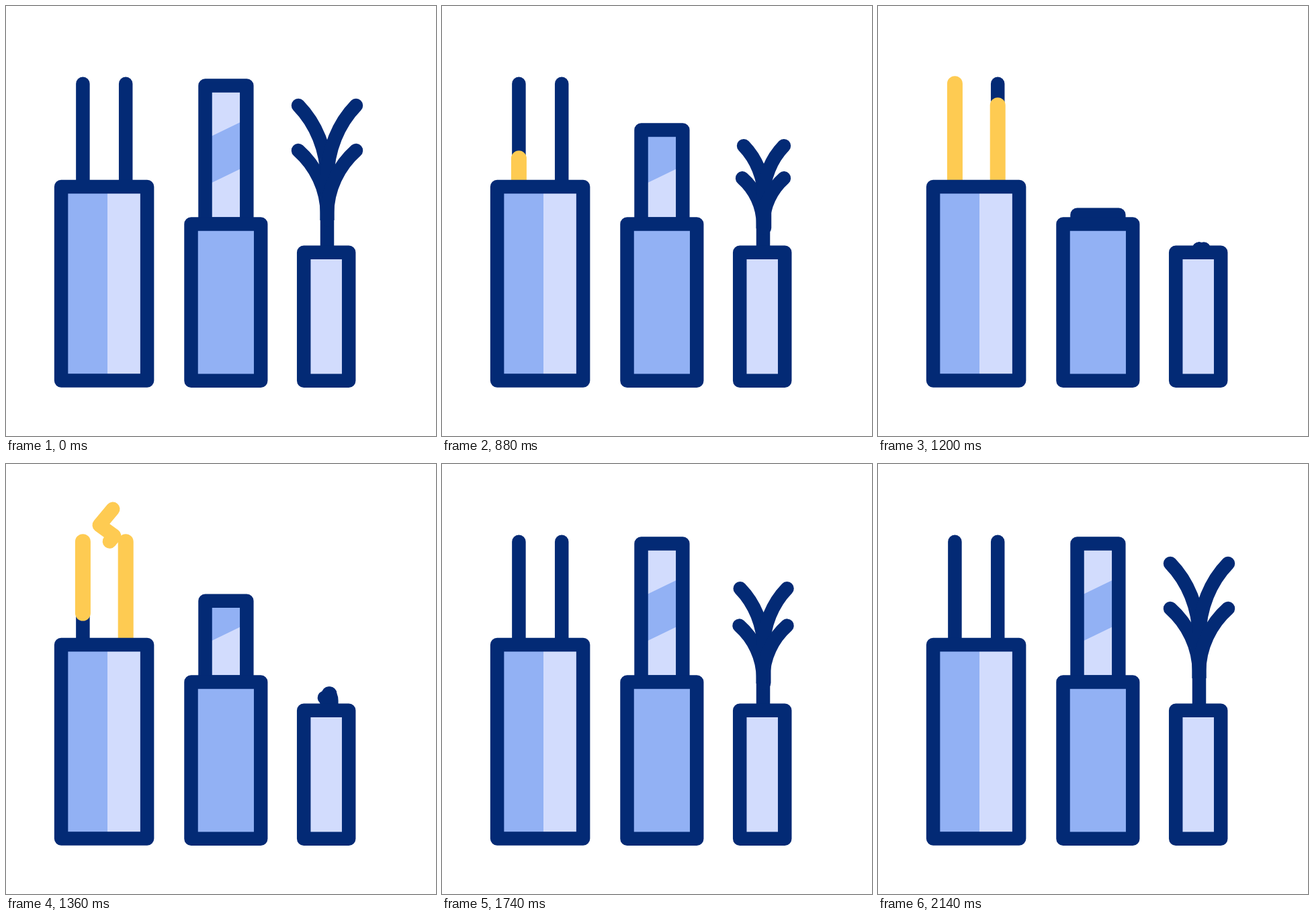
These frames come from a looping animation (640x640 px, 2420 ms). An HTML page with a canvas:

```html
<!DOCTYPE html>
<html lang="en">
<head>
<meta charset="utf-8">
<title>Cables</title>
<style>
  html, body { margin: 0; width: 100%; height: 100%; overflow: hidden; background: #fff; }
  canvas { display: block; width: 640px; height: 640px; }
</style>
</head>
<body>
<canvas id="stage" width="640" height="640"></canvas>
<script>
const ctx = document.getElementById('stage').getContext('2d');
const NAVY = '#032a75', MID = '#92b1f4', PALE = '#d2dcfd', GOLD = '#fecb52';
const LOOP = 2420, STEP = 20, START = 720;
const LINE = 20.5, FLOOR = 557.7, STEM = 478, SPREAD = 43;
const BOLT = [[159, 67], [139, 91], [161, 107], [141, 131]];

// Eased progress from 0 to 1 between two times.
function ease(t, from, to) {
  const x = Math.min(1, Math.max(0, (t - from) / (to - from)));
  return x * x * (3 - 2 * x);
}

function stroke(color, width) {
  ctx.strokeStyle = color;
  ctx.lineWidth = width;
  ctx.stroke();
}

function fill(color, left, top, right, bottom) {
  ctx.fillStyle = color;
  ctx.fillRect(left, top, right - left, bottom - top);
}

function outline(left, top, right, bottom) {
  ctx.beginPath();
  ctx.rect(left, top, right - left, bottom - top);
  stroke(NAVY, LINE);
}

// Strokes the part of a polyline between the shares a and b of its length.
function trim(points, a, b, color, width) {
  if (b <= a) return;
  let length = 0;
  ctx.beginPath();
  points.forEach(([x, y], i) => {
    ctx.lineTo(x, y);
    if (i) length += Math.hypot(x - points[i - 1][0], y - points[i - 1][1]);
  });
  ctx.setLineDash([(b - a) * length, 2 * length]);
  ctx.lineDashOffset = -a * length;
  stroke(color, width);
  ctx.setLineDash([]);
}

// A wire with a pulse running up it: the head leaves first, the tail follows.
function wire(x, t, head, tail) {
  const path = [[x, 269], [x, 115.7]];
  trim(path, 0, 1, NAVY, LINE);
  trim(path, ease(t, tail, tail + 250), ease(t, head, head + 255), GOLD, 23);
}

function copper(t) {
  wire(114.4, t, 792, 1268);
  wire(178.2, t, 1020, 1415);
  trim(BOLT, ease(t, 1400, 1540), ease(t, 1260, 1405), GOLD, 21);
  fill(MID, 82, 269, 151, FLOOR);
  fill(PALE, 151, 269, 210, FLOOR);
  outline(82.1, 269, 210.1, FLOOR - 0.3);
}

function coaxial(t) {
  const left = 296.5, right = 358.3, base = 324.4;
  const top = 118.4 + (base - 118.4) * (ease(t, 720, 1143) - ease(t, 1137, 1537));
  fill(PALE, left, top, right, base);
  // The slanted band stays in place while the tube slides over it.
  ctx.save();
  ctx.beginPath();
  ctx.rect(left, top, right - left, base - top);
  ctx.clip();
  ctx.beginPath();
  ctx.moveTo(left, 233);
  ctx.lineTo(right, 203);
  ctx.lineCap = 'square';
  stroke(MID, 62.5);
  ctx.restore();
  outline(left, top, right, base);
  fill(MID, 275.5, base, 379.2, FLOOR);
  outline(275.5, base, 379.2, FLOOR);
}

// One curved strand, shrinking towards the point (anchor, 362).
function strand(side, tip, height, anchor, size) {
  const x = dx => anchor + (STEM + side * dx * SPREAD - anchor) * size;
  const y = dy => 362 + (tip + dy * height - 362) * size;
  ctx.beginPath();
  ctx.moveTo(x(0), 362 - 44 * size);
  ctx.lineTo(x(0), y(1));
  ctx.bezierCurveTo(x(0), y(0.6), x(0.4), y(0.24), x(1), y(0));
  stroke(NAVY, LINE);
}

function fibre(t) {
  const size = 1 - ease(t, 700, 1215) + ease(t, 1226, 1926);
  trim([[STEM, 367], [STEM, 364 - 46 * size]], 0, 1, NAVY, LINE);
  for (const side of [-1, 1]) {
    strand(side, 148, 110, side < 0 ? 485 : STEM, size);
    strand(side, 215, 95, STEM, size);
  }
  for (const side of [-1, 0, 1]) {
    const ray = [[STEM + 31 * side, 110], [STEM + SPREAD * side, 52 + 23 * side * side]];
    trim(ray, ease(t, 1960, 2130), ease(t, 1810, 1970), GOLD, 21);
  }
  fill(PALE, 443.2, 366.8, 510.2, FLOOR);
  outline(443.2, 366.8, 510.2, FLOOR);
}

function draw(now) {
  let t = Math.floor((now % LOOP) / STEP) * STEP;
  if (t < START) t = 0;
  fill('#fff', 0, 0, 640, 640);
  copper(t);
  coaxial(t);
  fibre(t);
}

ctx.lineCap = ctx.lineJoin = 'round';
const begin = performance.now();
function tick() {
  draw(performance.now() - begin);
  requestAnimationFrame(tick);
}
tick();
</script>
</body>
</html>
```
